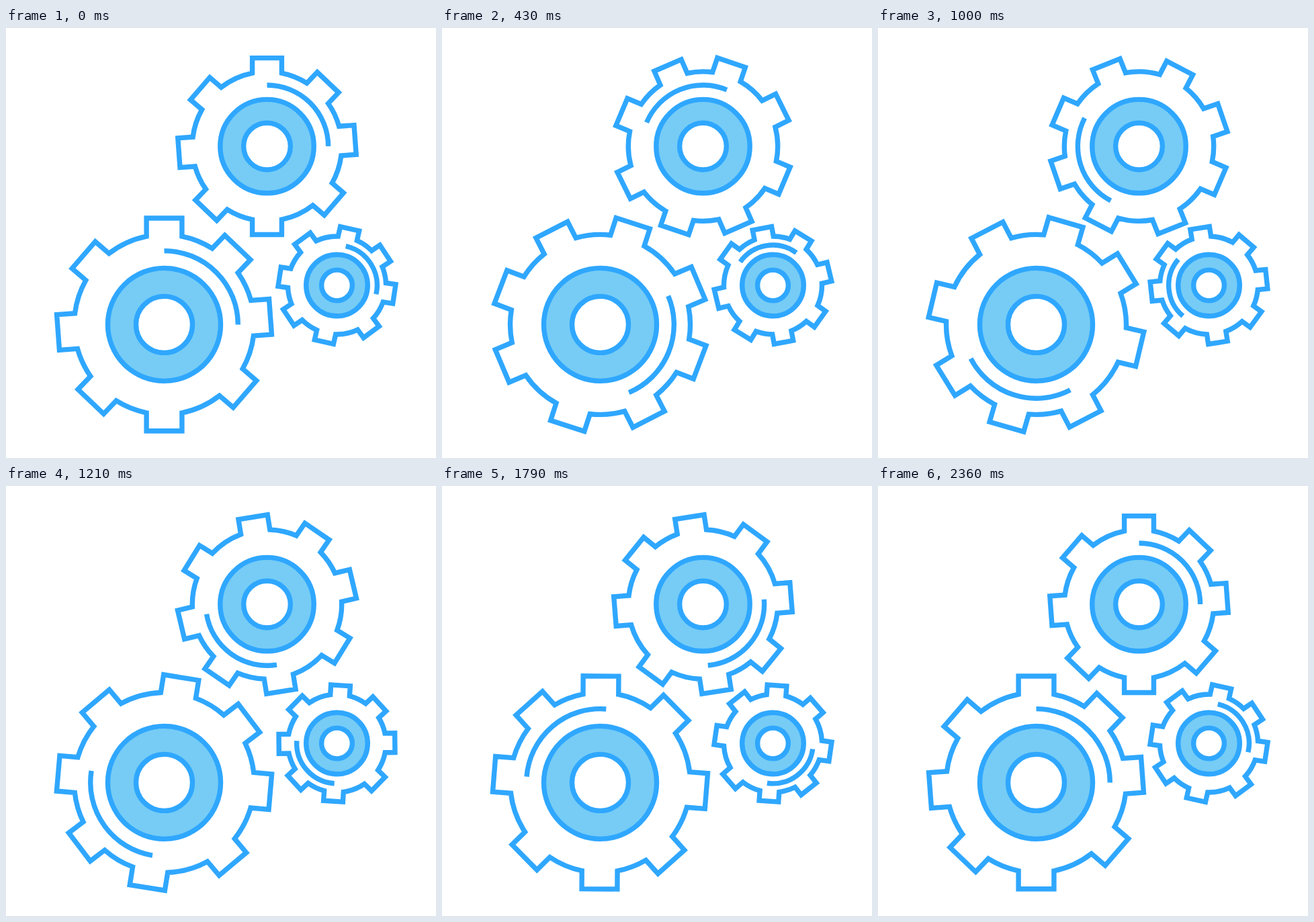
Write an HTML page that moves like this. It is 640x640 px and loops after 2430 ms.

```html
<!DOCTYPE html>
<html lang="en">
<head>
<meta charset="utf-8">
<title>Gears</title>
<style>
  html, body { margin: 0; width: 100%; height: 100%; overflow: hidden; background: #fff; }
  svg { display: block; width: 100%; height: 100%; }
  svg * { fill: none; stroke: #2fa7ff; stroke-width: 7.4; stroke-miterlimit: 10; }
  .disc { fill: #76ccf5; }
  .hole { fill: #fff; }
</style>
</head>
<body>
<svg id="stage" viewBox="0 0 640 640"></svg>
<script>
const NS = 'http://www.w3.org/2000/svg';
const stage = document.getElementById('stage');

// Unit gear: radii and tooth directions (half a turn, then repeated)
const BODY = 134, TIP = 158.4, HALF = 26.4, SHINE = 109.8, DISC = 84, HOLE = 42;
const HALF_TURN = [0, 43.6, 85.8, 130.8];
const TEETH = [...HALF_TURN, ...HALF_TURN.map(a => a + 180)];

const GEARS = [
  { x: 235.5, y: 441.4, scale: 1, start: 0, dir: 1 },
  { x: 388.5, y: 176.1, scale: 0.83, start: 0, dir: -1 },
  { x: 492.5, y: 383, scale: 0.545, start: 12.8, dir: -1 }
];

function add(parent, tag, attrs) {
  const node = document.createElementNS(NS, tag);
  for (const key in attrs) node.setAttribute(key, attrs[key]);
  return parent.appendChild(node);
}

function outline(s) {
  const r = BODY * s;
  const base = Math.sqrt(BODY * BODY - HALF * HALF);
  const corners = [[-HALF, base], [-HALF, TIP], [HALF, TIP], [HALF, base]];
  let d = '', first = '';
  for (const deg of TEETH) {
    const a = deg * Math.PI / 180, c = Math.cos(a), n = Math.sin(a);
    const p = corners.map(([u, v]) =>
      ((u * c + v * n) * s).toFixed(2) + ' ' + ((u * n - v * c) * s).toFixed(2));
    if (!d) first = p[0];
    d += (d ? `A${r} ${r} 0 0 1 ` : 'M') + p.join('L');
  }
  return `${d}A${r} ${r} 0 0 1 ${first}Z`;
}

for (const g of GEARS) {
  const s = g.scale, q = SHINE * s;
  const group = add(stage, 'g', { transform: `translate(${g.x} ${g.y})` });
  g.rotor = add(group, 'g', {});
  add(g.rotor, 'path', { d: outline(s) });
  add(g.rotor, 'path', { d: `M0 ${-q}A${q} ${q} 0 0 1 ${q} 0` });
  add(group, 'circle', { r: DISC * s, class: 'disc' });
  add(group, 'circle', { r: HOLE * s, class: 'hole' });
}

// The turn is 59 ticks at 25 per second, shown at 14 pictures per second
const LOOP = 2430, RATE = 14, TICK_RATE = 25, TICKS = 59;
const shownAt = k => Math.round(k * 100 / RATE) * 10;

function turnAt(ms) {
  const t = ms % LOOP;
  let k = Math.floor(t * RATE / 1000) + 1;
  while (shownAt(k) > t) k--;
  const tick = Math.floor((k + 0.5) * TICK_RATE / RATE);
  return Math.min(tick, TICKS) / TICKS * 360;
}

function draw(ms) {
  const turn = turnAt(ms);
  for (const g of GEARS) {
    g.rotor.setAttribute('transform', `rotate(${g.start + g.dir * turn})`);
  }
}

let origin = null;
function loop(now) {
  if (origin === null) origin = now;
  draw(Math.max(0, now - origin));
  requestAnimationFrame(loop);
}
draw(0);
requestAnimationFrame(loop);
</script>
</body>
</html>
```
